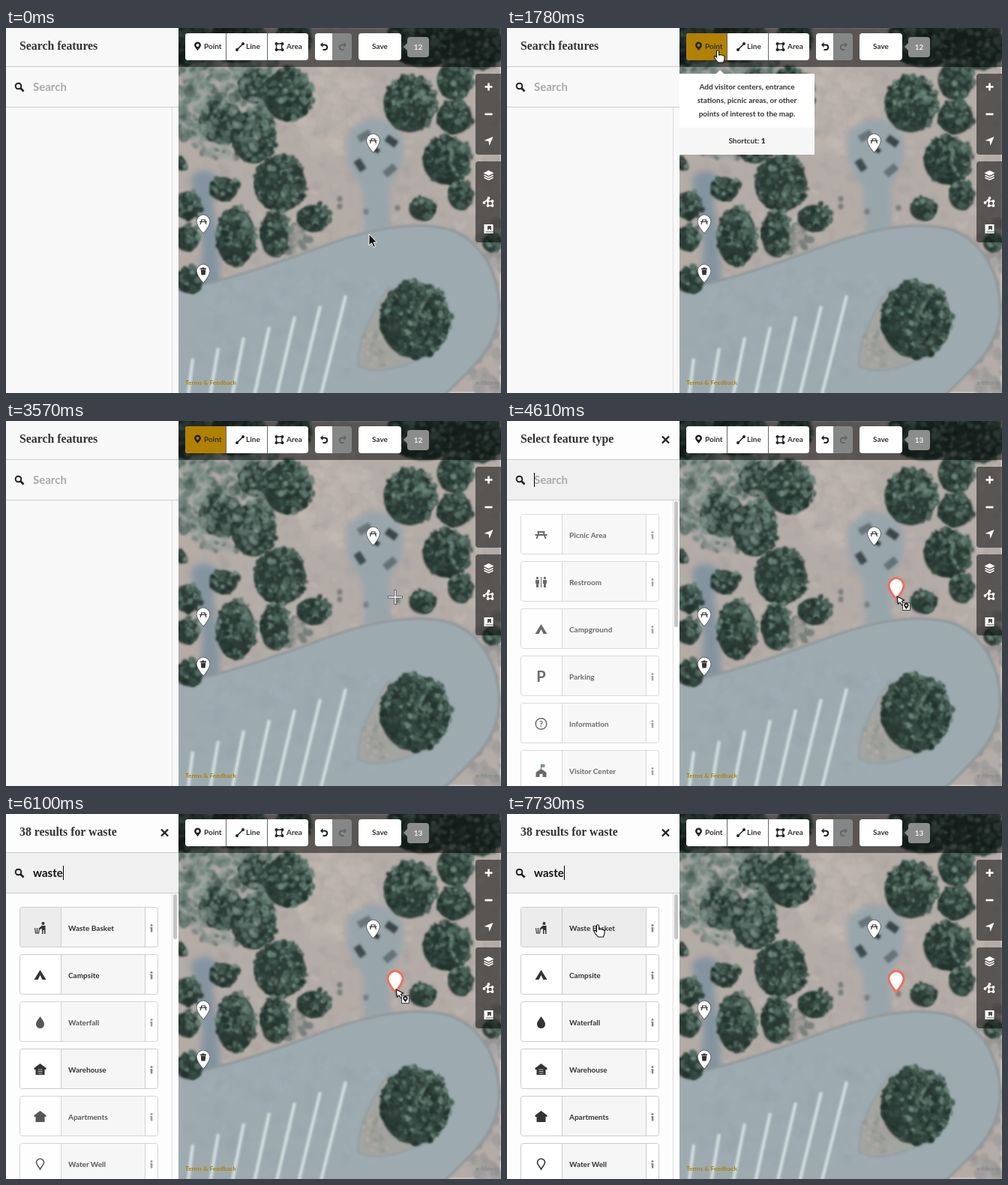
Write an HTML page with a canvas that moves like this. It is 660x487 px and loops after 8000 ms.

```html
<!DOCTYPE html>
<html lang="en">
<head>
<meta charset="utf-8">
<title>Map editor: adding a point</title>
<style>
  html, body { margin: 0; width: 100%; height: 100%; overflow: hidden; }
  canvas, svg { position: absolute; left: 0; top: 0; }
  text { font: 700 10px Lato, "Open Sans", sans-serif; fill: #333; }
  .title { font: 700 15.8px "Liberation Serif", "Noto Serif", serif; }
  .search { font-size: 15px; }
  .mid { text-anchor: middle; }
</style>
</head>
<body>
<canvas id="map" width="660" height="487"></canvas>
<svg id="ui" width="660" height="487" viewBox="0 0 660 487">
  <g id="chrome"></g>
  <g id="live"></g>
</svg>
<script>
const $ = id => document.getElementById(id);
const clamp = (v, a, b) => Math.max(a, Math.min(b, v));

// ---------- aerial map ----------
const ctx = $('map').getContext('2d');
let seed = 11;
const rnd = () => (seed = seed * 16807 % 2147483647) / 2147483647;

function blob(x, y, rx, ry, color, turn = 0) {
  ctx.fillStyle = color;
  ctx.beginPath();
  ctx.ellipse(x, y, rx, ry, turn, 0, 7);
  ctx.fill();
}
function fillPath(d, color, edge, width = 0) {
  const p = new Path2D(d);
  if (edge) { ctx.strokeStyle = edge; ctx.lineWidth = width; ctx.stroke(p); }
  ctx.fillStyle = color;
  ctx.fill(p);
}
// Scatter soft spots inside an ellipse; pick(dx, dy) chooses the colour.
function speckle(x, y, rx, ry, count, size, pick, alpha = 1) {
  ctx.globalAlpha = alpha;
  for (let i = 0; i < count; i++) {
    const a = rnd() * 6.283, r = Math.sqrt(rnd());
    const dx = Math.cos(a) * r, dy = Math.sin(a) * r;
    blob(x + dx * rx, y + dy * ry, size * (.5 + rnd()), size * (.5 + rnd()), pick(dx, dy), a);
  }
  ctx.globalAlpha = 1;
}
const oneOf = list => () => list[Math.floor(rnd() * list.length)];
const dark = oneOf(['#22332d', '#2b3e37', '#374c44']);
const light = oneOf(['#455d53', '#546d63', '#6b857a']);

function tree([x, y, rx, ry]) {
  blob(x - 2, y + 2, rx * .92, ry * .93, '#2d3c37');
  speckle(x, y, rx * .95, ry * .95, rx * ry / 8, 3,
    (dx, dy) => rnd() + (dx - dy) * .3 > .5 ? light() : dark());
}

function drawMap() {
  ctx.filter = 'blur(1.4px)';
  ctx.fillStyle = '#b4aca7';
  ctx.fillRect(0, 0, 660, 487);
  speckle(445, 160, 300, 240, 900, 5, oneOf(['#c9c0ba', '#a09d9a', '#b8aaa2', '#a9a7a5']), .3);
  speckle(430, 95, 60, 75, 90, 9, oneOf(['#c8bdb6', '#c0b5af']), .3);
  speckle(650, 440, 40, 190, 200, 6, oneOf(['#8f9292', '#a09e9b', '#858a8a']), .5);
  speckle(280, 70, 90, 85, 420, 6, oneOf(['#7c8c87', '#93a09b', '#63766f', '#a5a5a0', '#4f645d']), .75);
  speckle(375, 280, 30, 20, 70, 4, oneOf(['#8a908c', '#77807c', '#a09c97']));

  // paved paths and picnic pad
  ctx.filter = 'blur(4px)';
  fillPath('M246 200Q262 182 282 198L276 235 282 280 286 345 256 350 262 290 254 240Z', '#8394a0');
  fillPath('M455 140Q470 120 500 122Q530 130 530 160Q530 192 512 206L513 272 478 275 475 212Q450 190 455 140Z', '#98a5ab');
  ctx.filter = 'blur(1.4px)';
  fillPath('M225 352C300 338 370 312 430 290C490 268 540 262 575 267C625 273 655 320 656 372C656 425 620 452 580 492H225Z',
    '#9dabb1', '#8e9799', 6);
  speckle(400, 400, 160, 80, 200, 7, oneOf(['#a4b1b6', '#96a5ab']), .25);

  // parking bays
  ctx.strokeStyle = '#d6e2e3';
  ctx.lineWidth = 4;
  for (let i = 0; i < 7; i++) {
    ctx.beginPath();
    ctx.moveTo(453 - 34 * i, 357 + 14 * i);
    ctx.lineTo(420 - 29.5 * i, 489);
    ctx.stroke();
  }

  // island
  fillPath('M510 348C486 385 468 425 471 450C492 463 530 452 570 432Z', '#a3a5a1', '#939ea1', 4);
  speckle(497, 425, 22, 28, 60, 3, oneOf(['#b1aba4', '#8f9592', '#a3a09a']), .8);

  // tall bushes, softened by a pale grey haze
  [[240, 20, 45, 30], [310, 15, 40, 32], [335, 75, 25, 25], [290, 125, 32, 30], [332, 143, 32, 38]].forEach(tree);
  speckle(295, 95, 75, 80, 330, 4, oneOf(['#8b9c97', '#7a8d87', '#9aa6a1', '#5f756d', '#3c524a']), .55);

  [[385, 12, 24, 28], [560, 15, 52, 38], [630, 22, 38, 34], [378, 88, 35, 37], [367, 206, 37, 40],
   [292, 213, 20, 17], [360, 273, 20, 33], [308, 277, 28, 42], [411, 252, 23, 19], [600, 68, 25, 28],
   [600, 117, 25, 24], [540, 100, 37, 40], [589, 175, 34, 34], [608, 222, 18, 20], [557, 240, 19, 16],
   [244, 235, 18, 20], [243, 279, 18, 18], [246, 335, 20, 18], [236, 180, 7, 9], [650, 285, 14, 13],
   [547, 388, 50, 54]].forEach(tree);

  // picnic tables and small bushes
  [[478, 144, 9, 5, -.5, '#68747a'], [514, 151, 8, 5, .6, '#3b464a'], [472, 183, 8, 5, 1, '#3f4b50'],
   [512, 190, 9, 5, -.7, '#667278'], [494, 163, 4, 3, .5, '#30383c']].forEach(([x, y, w, h, turn, color]) => {
    ctx.save();
    ctx.translate(x, y);
    ctx.rotate(turn);
    ctx.fillStyle = color;
    ctx.fillRect(-w, -h, 2 * w, 2 * h);
    ctx.restore();
  });
  [[445, 238], [480, 245], [522, 240], [445, 228]].forEach(([x, y]) => blob(x, y, 3.5, 4, '#7a7d7b'));
  ctx.filter = 'none';
}

// ---------- vector helpers ----------
const shape = (d, fill = 'currentColor') => `<path d="${d}" fill="${fill}"/>`;
const line = (d, w = 2, color = 'currentColor') =>
  `<path d="${d}" fill="none" stroke="${color}" stroke-width="${w}"/>`;
const rect = (x, y, w, h, fill, rx = 0, more = '') =>
  `<rect x="${x}" y="${y}" width="${w}" height="${h}" rx="${rx}" fill="${fill}" ${more}/>`;
const text = (x, y, s, cls = '', style = '') => `<text x="${x}" y="${y}" class="${cls}" style="${style}">${s}</text>`;
const at = (x, y, body, more = '') => `<g transform="translate(${x} ${y})" ${more}>${body}</g>`;
const scaled = (k, body) => `<g transform="scale(${k})">${body}</g>`;
const dot = (x, y, r) => `<circle cx="${x}" cy="${y}" r="${r}" fill="currentColor"/>`;
const ring = (x, y, r, w) => `<circle cx="${x}" cy="${y}" r="${r}" fill="none" stroke="currentColor" stroke-width="${w}"/>`;

const DROP = 'M17 8C17 13 11 21 8.5 23.5C6 21 0 13 0 8C0 4 4-.5 8.5-.5C13-.5 17 4 17 8Z';
const marker = 'M0 5C-2 2-4.5 0-4.5-2A4.5 4.5 0 0 1 4.5-2C4.5 0 2 2 0 5ZM0-4A2 2 0 0 0 0 0A2 2 0 0 0 0-4Z';
const person = x => dot(x, -5.5, 1.7) + shape(`M${x - 2.5}-3H${x + 2.5}V2H${x + 1.5}V7H${x - 1.5}V2H${x - 2.5}Z`);
const house = shape('M0-8 8-2V0H6V7H-6V0H-8V-2Z');

const icons = {
  picnic: line('M-5-4H5M-8 0H8M-3-4-6 5M3-4 6 5'),
  restroom: person(-5) + person(5) + line('M0-7V7', 1),
  camp: shape('M0-7 8 6H3L0 0-3 6H-8Z'),
  parking: text(0, 7, 'P', 'mid', 'font-size:20px;fill:currentColor'),
  info: ring(0, 0, 7.3, 1.5) + text(0, 4, '?', 'mid', 'font-size:11px;fill:currentColor'),
  visitor: shape('M0-3 7 2V8H2V4H-2V8H-7V2Z') + line('M0-3V-9', 1) + shape('M0-9H5V-5H0Z', '#3f7a5a'),
  none: '',
  woods: dot(0, -4, 4) + dot(-3, -1, 3) + dot(3, -1, 3) + shape('M-1 0H1V8H-1Z'),
  wetland: shape('M-6 0Q0 5 5 0L6-5 3-6 2-2-3-3Z') + line('M-8 5Q-5 3-3 5T3 5T8 5', 1.5),
  warehouse: house + line('M-3 0H3M-3 2.5H3M-3 5H3', 1, '#bbb'),
  apartments: house,
  drop: shape('M0-8C3-3 5.5-1 5.5 2.5A5.5 5.5 0 0 1-5.5 2.5C-5.5-1-3-3 0-8Z'),
  well: line('M0 7C-2 3-5 1-5-2A5 5 0 0 1 5-2C5 1 2 3 0 7Z', 1.6),
  waste: dot(4, -6, 2) + shape('M2-3H7V8H5.5V3H4V8H2.5V1L-1 2V0Z') + line('M-7 0-6 7H-2L-1 0M-4 0V7', 1.2)
};

function pin(x, y, icon = '', selected = false) {
  return at(x - 8.5, y, (selected ? line(DROP, 6, '#ef6f5c') : line(DROP, 1.4, '#444')) +
    shape(DROP, '#fff') + at(8.5, 8.5, icon, 'color="#333"'));
}

const cursors = {
  arrow: '<path d="M0 0V15L3.5 11.8 6 17.5 8.5 16.5 6 11H10.5Z" fill="#111" stroke="#fff"/>',
  hand: '<path d="M-1.5 9V1.3A1.5 1.5 0 0 1 1.5 1.3V6L4 5.6 6.5 6.5 9 7.3V11.5L7.5 16H.5L-3 12-5 8.5Q-4 6-1.5 9Z" ' +
    'fill="#fff" stroke="#111" stroke-width="1.1"/>',
  cross: line('M-10 0H10M0-10V10', 3.4, '#566369') + line('M-9 0H9M0-9V9', 1.4, '#fff'),
  place: '<path d="M0 0 1.5 10 4 8 7 12 9 10.5 6.5 6.5 9.5 5Z" fill="#fff" stroke="#111" stroke-width="1.2"/>' +
    rect(7.5, 8.5, 10, 10, '#eee', 0, 'stroke="#444"') + at(12.5, 13.5, scaled(.7, shape(marker, '#111')))
};

// ---------- fixed interface ----------
function drawChrome() {
  const trash = shape('M-4-4H4V-2.5H-4ZM-3.3-2H3.3L2.6 5H-2.6ZM-1.5-5H1.5V-4H-1.5Z');
  const table = line('M-3-2.5H3M-5 0H5M-2-2.5-4 3.5M2-2.5 4 3.5', 1.2);
  const panels = [61, 178].map(y => rect(626, y, 40, 108, '#000', 4, 'opacity=".5"')).join('');
  const tools = [
    line('M-5 0H5M0-5V5', 2.6), line('M-5 0H5', 2.6), shape('M6-6 1 6 0 0-6-1Z'),
    shape('M0-6 7-2.5 0 1-7-2.5Z') + line('M-6 .5 0 3.5 6 .5M-6 3.5 0 6.5 6 3.5', 1.4),
    line('M-7 2 0-5M-1-1V5H5V-1ZM-1-1-3-3', 1.5) + [[-6, 1], [0, -5], [-1, -1], [5, -1], [-1, 5], [5, 5]].map(p => dot(...p, 1.9)).join(''),
    shape('M-6-6H6V6H-6ZM-1.5-4V2L1 0 3.5 2V-4Z') + line('M-4 4H6', 1, '#555')
  ].map((icon, i) => at(643.5, [78.5, 115, 151, 196, 232, 268][i], icon, 'color="#fff"')).join('');
  const undo = line('M-3-2.5H1A3.3 3.3 0 0 1 1 4H-2', 2) + shape('M-5.5-2.5-2-6V1Z');

  $('chrome').innerHTML =
    pin(489.5, 142, table) + pin(263, 250, table) + pin(263, 316, trash) +
    rect(230, 0, 430, 52, '#000', 0, 'opacity=".5"') +
    rect(239, 7, 164, 36, '#fff', 4) + line('M348.5 7V43', 1, '#666') +
    at(312, 25, line('M-4 4 4-4', 1.6) + dot(-4, 4, 2) + dot(4, -4, 2), 'color="#222"') + text(320, 28, 'Line') +
    at(364.5, 25, line('M-4-4H4L3 0 4 4H-4Z', 1.4) + [[-4, -4], [4, -4], [4, 4], [-4, 4]].map(p => dot(...p, 2)).join(''),
      'color="#222"') + text(374, 28, 'Area') +
    shape('M416 7H435V43H416Q412 43 412 39V11Q412 7 416 7Z', '#fff') +
    shape('M435 7H457Q461 7 461 11V39Q461 43 457 43H435Z', '#858787') +
    at(424.5, 25, undo, 'color="#222"') + at(448.5, 25, scaled('-1 1', undo), 'color="#626565"') +
    rect(470, 7, 57, 36, '#fff', 4) + text(498.5, 28, 'Save', 'mid') +
    rect(535, 12, 29, 27, '#8b8d8d', 4) + shape('M536 19 530 25 536 31Z', '#8b8d8d') +
    panels + tools +
    text(239, 476, 'Terms &amp; Feedback', '', 'font-size:8.4px;fill:#b08000') +
    text(626, 476, 'x-tiles-o', '', 'font-size:8.4px;fill:#858b8b');
}

// ---------- sidebar ----------
const lists = {
  start: [['Picnic Area', 'picnic'], ['Restroom', 'restroom'], ['Campground', 'camp'], ['Parking', 'parking'],
    ['Information', 'info'], ['Visitor Center', 'visitor']],
  partial: [['Wifi', 'none'], ['Woods', 'woods'], ['Wetland', 'wetland'], ['Warehouse', 'warehouse'],
    ['Waterfall', 'drop'], ['Water Well', 'well']],
  full: [['Waste Basket', 'waste'], ['Campsite', 'camp'], ['Waterfall', 'drop'], ['Warehouse', 'warehouse'],
    ['Apartments', 'apartments'], ['Water Well', 'well']]
};

function row([name, icon], i, opacity, picked, hover) {
  const info = dot(176, 24.5, 1.5) + shape('M174.3 27H177.3V33.5H174.8V28.5H174.3Z');
  return at(18, 124 + 63 * i,
    rect(.5, .5, 184, 53, '#fff', 3) +
    rect(1, 1, 54, 52, picked ? '#ececec' : '#fff', 2) +
    rect(55, 1, 112, 52, hover ? '#ececec' : '#f5f5f5') +
    rect(.5, .5, 184, 53, 'none', 3, 'stroke="#ccc"') + line('M55.5 1V53M167.5 1V53', 1, '#ccc') +
    at(27.5, 28, icons[icon], 'color="#333"') + text(65, 32, name) +
    `<g color="#888">${info}</g>`, `opacity="${opacity}"`);
}

function sidebar(t, hover) {
  const open = t >= 4460, step = Math.floor((t - 5360) / 147);
  const typed = t < 5360 ? '' : 'waste'.slice(0, Math.max(1, step));
  const title = !open ? 'Search features' : t < 5510 ? 'Select feature type'
    : `${typed.length < 3 ? 36 : 38} results for ${typed}`;
  let out = rect(0, 0, 230, 487, open ? '#fdfdfd' : '#f8f8f8') +
    rect(0, 52, 230, 53, open ? '#f0f0f0' : '#f8f8f8') +
    line('M0 51.5H230M0 105.5H230', 1, '#ccc') + line('M221.5 106V487', 1, '#ddd') +
    text(18, 29, title, 'title') +
    `<g color="#222">${ring(16.5, 77.5, 3.8, 2)}${line('M19 80 23.5 84.5', 2.6)}</g>` +
    text(36, 84, typed || 'Search', 'search', `fill:${typed ? '#111' : '#aaa'}`);
  if (!open) return out;

  out += line('M207 20.5 216 29.5M216 20.5 207 29.5', 2.4, '#222');
  const caret = 36.5 + [0, 12, 19.5, 26, 32, 40][typed.length];
  if (t >= 4610 && !(t >= 7280 && t < 7730)) out += line(`M${caret} 69V88`, 1, '#000');

  const list = lists[!typed ? 'start' : typed.length < 5 ? 'partial' : 'full'];
  const fade = !typed ? (t < 4610 ? .3 : t < 4760 ? .72 : 1) : [0, .15, .4, .65, .8][step] ?? 1;
  list.forEach((item, i) => {
    const late = step === 5 && [2, 4, 5].includes(i);
    out += row(item, i, late ? .82 : fade, step >= 5 && i === 0, hover && i === 0);
  });
  return out + rect(223, 107, 5, typed ? 60 : 168, '#c6c6c6', 2.5);
}

// ---------- pointer and popover ----------
// Stepped ease-out: a new position every 147 ms.
function glide(t, start, steps, from, to, power = 2) {
  const p = clamp(Math.floor((t - start) / 147) + 1, 0, steps) / steps;
  const k = 1 - (1 - p) ** power;
  return from.map((v, i) => Math.round(v + (to[i] - v) * k));
}

function pointer(t) {
  if (t < 2080) return [t < 740 ? 'arrow' : 'hand', ...glide(t, 290, 5, [484, 275], [281, 30])];
  if (t < 2530) return ['cross', ...glide(t, 2080, 2, [282, 38], [464, 204])];
  if (t < 4460) return ['cross', ...(t < 4010 ? glide(t, 2530, 8, [464, 204], [519, 235], 5.2) : [520, 235])];
  if (t < 6690) return ['place', 520, 234];
  return [t < 7130 ? 'arrow' : 'hand', ...glide(t, 6690, 5, [520, 234], [121, 148])];
}

function tooltip(t) {
  const opacity = t < 740 ? 0 : t < 880 ? .4 : t < 1030 ? .8 : t < 2080 ? 1 : t < 2230 ? .4 : 0;
  if (!opacity) return '';
  const words = ['Add visitor centers, entrance', 'stations, picnic areas, or other', 'points of interest to the map.'];
  return `<g opacity="${opacity}">` + shape('M279 61 284 56 289 61Z', '#fff') +
    rect(230, 61, 180, 108, '#fff') + rect(230, 133, 180, 36, '#f6f6f6') +
    words.map((s, i) => text(320, 82 + 18 * i, s, 'mid')).join('') +
    text(320, 154, 'Shortcut: <tspan font-weight="900">1</tspan>', 'mid') + '</g>';
}

function scene(t) {
  const [kind, x, y] = pointer(t);
  const placed = t >= 4460, active = t >= 1780 && !placed;
  const fill = active ? '#b18104' : t >= 740 && t < 1780 ? '#ececec' : '#fff';
  return sidebar(t, t >= 7130) +
    shape('M243 7H293V43H243Q239 43 239 39V11Q239 7 243 7Z', fill) + line('M293.5 7V43', 1, '#666') +
    at(255.5, 25, shape(marker, '#222')) + text(264, 28, 'Point') +
    text(549.5, 29, placed ? 13 : 12, 'mid', 'fill:#eee') +
    (placed ? pin(519, 211.5, '', true) : '') +
    tooltip(t) + at(x, y, cursors[kind]);
}

drawMap();
drawChrome();
let shown = '';
function frame() {
  const next = scene(performance.now() % 8000);
  if (next !== shown) $('live').innerHTML = shown = next;
  requestAnimationFrame(frame);
}
frame();
</script>
</body>
</html>
```
